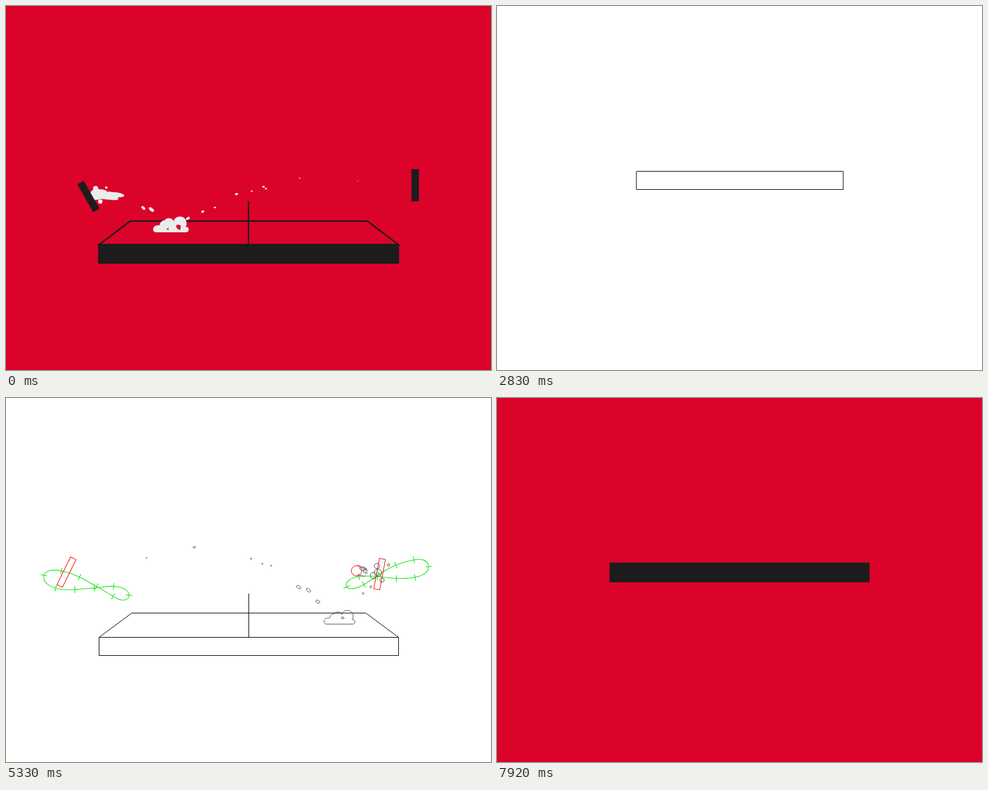
An HTML page with a canvas for the animation above (8 s loop, 800 by 600 pixels).

```html
<!DOCTYPE html>
<html lang="en">
<head>
<meta charset="utf-8">
<title>Table tennis</title>
<style>
  html, body { margin: 0; width: 100%; height: 100%; overflow: hidden; background: #fff; }
  canvas { display: block; }
  svg { position: absolute; }
</style>
</head>
<body>
<canvas id="stage" width="800" height="600"></canvas>
<svg width="0" height="0">
  <path id="left" fill="none" d="M203 325C203 333 193 336 182 330C168 322 158 315 150 311C130 300 115 290 95 286C78 281 62 284 62 295C62 306 75 314 96 316C115 316.5 130 314 150 313C165 311 172 309 183 311C195 313 203 318 203 325Z"/>
  <path id="right" fill="none" d="M697 278C697 268 687 264 672 267C655 270 640 276 626 284C610 294 600 302 588 309C574 316 560 317 561 308C562 300 570 296 585 294C605 292 622 296 645 297.5C672 298 697 294 697 278Z"/>
</svg>
<script>
const ctx = document.getElementById('stage').getContext('2d');
const FPS = 12, FRAMES = 96, CYCLE = 59, SWITCH = 21, FLOOR = 365;
const RED = '#db0329', INK = '#1c1c1c', WHITE = '#ebebeb', GREY = '#505050', GREEN = '#14e014';

const clamp = t => Math.min(1, Math.max(0, t));
const smooth = t => { t = clamp(t); return t * t * (3 - 2 * t); };
const mix = (a, b, t) => a + (b - a) * t;
const wave = turns => Math.cos(turns * 2 * Math.PI);
const random = n => { const s = Math.sin(n * 127.1 + 11.7) * 43758.5453; return s - Math.floor(s); };
let wire = false;

// Times are frames within the cycle; the rally alternates right and left hits.
const hits = [54.85, 59, 63.67, 68.33, 73];
const toLeft = { x0: 611, y0: 288, x1: 147, y1: 311, bounce: 272, hump: 30, rise: 2, tail: .72 };
const toRight = { x0: 147, y0: 311, x1: 614, y1: 294, bounce: 550, hump: 88, rise: 1, tail: .55 };
const shots = [
  { t0: 51, t1: hits[0], x0: 611, y0: 17, x1: 611, y1: 288, tail: .6, serve: true, count: 9 },
  ...hits.slice(1).map((t1, i) => ({ t0: hits[i], t1, count: 18, ...(i % 2 ? toRight : toLeft) })),
  { t0: hits[4], t1: 78, x0: 614, y0: 294, x1: -40, y1: 262, hump: 48, tail: 1, count: 18 },
];
shots.forEach((s, i) => { s.seed = 100 * (i + 1); });

function ballAt(s, u) {
  const x = mix(s.x0, s.x1, u);
  if (s.serve) return [x, mix(s.y0, s.y1, u * u)];
  const turn = s.bounce ? (s.bounce - s.x0) / (s.x1 - s.x0) : 1;
  if (u > turn) return [x, mix(s.y1, FLOOR, ((1 - u) / (1 - turn)) ** s.rise)];
  const k = u / turn;
  return [x, mix(s.y0, s.bounce ? FLOOR : s.y1, k) - 4 * s.hump * k * (1 - k)];
}

function heading(s, u) {
  const [ax, ay] = ballAt(s, Math.max(0, u - .02)), [bx, by] = ballAt(s, Math.min(1, u + .001));
  return Math.atan2(by - ay, bx - ax);
}

function makePaddle(id, options) {
  const track = document.getElementById(id), length = track.getTotalLength();
  const at = f => track.getPointAtLength((f - Math.floor(f)) * length);
  return { at, outline: new Path2D(track.getAttribute('d')), ...options };
}

const paddles = [
  makePaddle('left', { hits: [hits[1], hits[3]], contact: .77, rest: .5, ready: 47, power: 1.2,
    lastSwing: 13, enter: 40, dx: 10, dy: 250, tilt: f => 30 * wave(f - .29) }),
  makePaddle('right', { hits: [hits[0], hits[2], hits[4]], contact: .24, rest: 0, ready: 48, power: 1.7,
    lastSwing: 12, enter: 38, dx: 45, dy: 300, tilt: f => 18 * wave(f - .15) }),
];

// Share of the track covered: a wind-up to the first hit, then one lap per hit.
function trackShare(p, v) {
  const i = p.hits.findLastIndex(h => h <= v);
  if (i < 0) return mix(p.rest, p.contact, clamp((v - p.ready) / (p.hits[0] - p.ready)) ** 2);
  const span = (p.hits[i + 1] ?? p.hits[i] + p.lastSwing) - p.hits[i];
  return p.contact + 1 - (1 - clamp((v - p.hits[i]) / span)) ** p.power;
}

const tailShape = new Path2D('M0-8.5C8-10 26-9 27-5.5C40-5.5 52-5.5 60-3.5C71-1 69 3 52 3' +
  'C55 5 53 8 48 8C35 8 22 7 12 6.5C10 8 6 8.5 0 8.5');
const cloudShape = new Path2D('M-26 0C-33-1-32-12-22-12C-20-12-19-12-19-13C-18-19-13-21-11-20' +
  'C-9-25 2-26 5-19C6-30 28-31 27-14C27-12 26-11 25-9C31-11 33-1 27 0Z');
const cloudHole = new Path2D('M9-12C12-14 17-13 17-10L16-4C11-5 9-8 9-12ZM-8-5L-4-8V-4Z');

function paint(path, fill, line, width = 1) {
  if (wire) {
    ctx.strokeStyle = line;
    ctx.lineWidth = width;
    ctx.stroke(path);
  } else {
    ctx.fillStyle = fill;
    ctx.fill(path);
  }
}

function oval(x, y, rx, ry = rx, angle = 0, line = GREY) {
  const p = new Path2D();
  p.ellipse(x, y, rx, ry, angle, 0, 7);
  paint(p, WHITE, line);
}

function box(cx, cy, w, h, line) {
  const p = new Path2D();
  p.rect(cx - w / 2, cy - h / 2, w, h);
  paint(p, INK, line);
}

function placed(x, y, angle, sx, sy, draw) {
  ctx.save();
  ctx.translate(x, y);
  ctx.rotate(angle);
  ctx.scale(sx, sy);
  draw();
  ctx.restore();
}

function drawTop(front, fall, depth, v) {
  const back = front - depth * fall, inset = (wire ? 54 : 51.5) * fall;
  const net = smooth((v - 46) / 5), x = wire ? 400.5 : 400;
  ctx.strokeStyle = wire ? '#000' : INK;
  ctx.lineWidth = wire ? 1 : 2.3;
  ctx.beginPath();
  ctx.moveTo(153.5, front);
  ctx.lineTo(153.5 + inset, back);
  ctx.lineTo(647.5 - inset, back);
  ctx.lineTo(647.5, front);
  ctx.closePath();
  if (net > 0) {
    ctx.moveTo(x, front);
    ctx.lineTo(x, front - 72 * net);
  }
  ctx.stroke();
}

// A square pops in, widens to a bar, drops and opens into the table.
function drawTable(v) {
  const size = 30 * smooth((v - 21.6) / 4.4);
  if (size === 0) return;
  const grow = 1 - (1 - clamp((v - 29.57) / 10.4)) ** 2;
  const fall = smooth((v - 39.5) / 11), drop = wire ? 122 : 121;
  const middle = 287.5 + Math.round(drop * fall), border = wire ? 0 : 2.5;
  if (fall > 0) drawTop(middle - 15, fall, drop - 82, v);
  box(wire ? 400.5 : 400.1, middle, size + 464 * grow + border, size + border, '#000');
}

function drawTrack({ at, outline }) {
  ctx.strokeStyle = GREEN;
  ctx.lineWidth = 1.1;
  ctx.stroke(outline);
  ctx.beginPath();
  for (let f = 0; f < 1; f += .1) {
    const p = at(f), q = at(f + .005), d = Math.hypot(q.x - p.x, q.y - p.y) / 5.5;
    const dx = (p.y - q.y) / d, dy = (q.x - p.x) / d;
    ctx.moveTo(p.x - dx, p.y - dy);
    ctx.lineTo(p.x + dx, p.y + dy);
  }
  ctx.stroke();
}

// Drops stay where the ball shed them and shrink.
function drawDrops(s, v) {
  for (let i = 0; i < s.count; i++) {
    const r = k => random(s.seed + i * 5 + k);
    const u = (i + r(0)) / s.count, age = v - mix(s.t0, s.t1, u);
    const length = (4 + 13 * r(1) ** 2) * (1 - age / (2.8 + 2.6 * r(2)));
    if (age < 0 || length < .8) continue;
    const [x, y] = ballAt(s, u), wobble = r(3) - .5;
    oval(x + 8 * wobble, y + 10 * (r(4) - .5), length / 2, length * mix(.4, .18, length / 16),
      heading(s, u) + wobble * .8);
  }
}

function drawSplash(s, v) {
  const age = v - s.t0 + .4;
  if (s.serve || age <= 0 || age > 3.2) return;
  const size = Math.min(1, age / .4, (3.2 - age) / 1.6);
  for (let i = 0; i < 6; i++) {
    const angle = i * 2.4, reach = (3 + 5 * i) * (.7 + .2 * age);
    const radius = (6 - .8 * i) * size;
    oval(s.x0 + reach * Math.cos(angle), s.y0 + reach * Math.sin(angle), radius);
  }
}

function drawCloud(s, v) {
  if (!s.bounce) return;
  const age = v - mix(s.t0, s.t1, (s.bounce - s.x0) / (s.x1 - s.x0));
  const k = Math.min(age * .86, 1.58 - age / 2);
  if (k <= .02) return;
  placed(s.bounce, 371.5 + 1.5 * k, 0, k, k, () => {
    paint(cloudShape, WHITE, GREY, 1 / k);
    if (!wire && k > .8) {
      ctx.fillStyle = RED;
      ctx.fill(cloudHole);
    }
  });
}

function drawBall(s, v) {
  const u = (v - s.t0) / (s.t1 - s.t0);
  if (u < 0 || u > 1 || (u === 0 && !s.serve)) return;
  const [x, y] = ballAt(s, u);
  const length = mix(1, s.tail, u * u) * Math.min(1, u * 4);
  if (length > .05)
    placed(x, y, heading(s, u) + Math.PI, length, 1, () => paint(tailShape, WHITE, GREY));
  oval(x, y, 8.5, 8.5, 0, '#f00');
}

function drawPaddle(p, v) {
  if (v < p.enter) return;
  const share = trackShare(p, v), { x, y } = p.at(share);
  const below = (1 - clamp((v - p.enter) / 18)) ** 2;
  const tilt = p.tilt(share) * (1 - below) * Math.PI / 180;
  const border = wire ? 0 : 2;
  placed(x + p.dx * below, y + p.dy * below, tilt, 1, 1, () => box(0, 0, 10 + border, 51 + border, '#f00'));
}

function draw(ms) {
  const frame = Math.floor((ms + 4) * FPS / 1000) % FRAMES;
  const v = frame < SWITCH ? frame + CYCLE : SWITCH + (frame - SWITCH) % CYCLE;
  wire = frame >= SWITCH && frame < SWITCH + CYCLE;
  ctx.fillStyle = wire ? '#fff' : RED;
  ctx.fillRect(0, 0, 800, 600);
  drawTable(v);
  if (wire && v >= 50) paddles.forEach(drawTrack);
  for (const part of [drawDrops, drawSplash, drawCloud, drawBall])
    for (const s of shots) part(s, v);
  for (const p of paddles) drawPaddle(p, v);
}

const start = performance.now();
function tick() {
  draw(performance.now() - start);
  requestAnimationFrame(tick);
}
tick();
</script>
</body>
</html>
```
